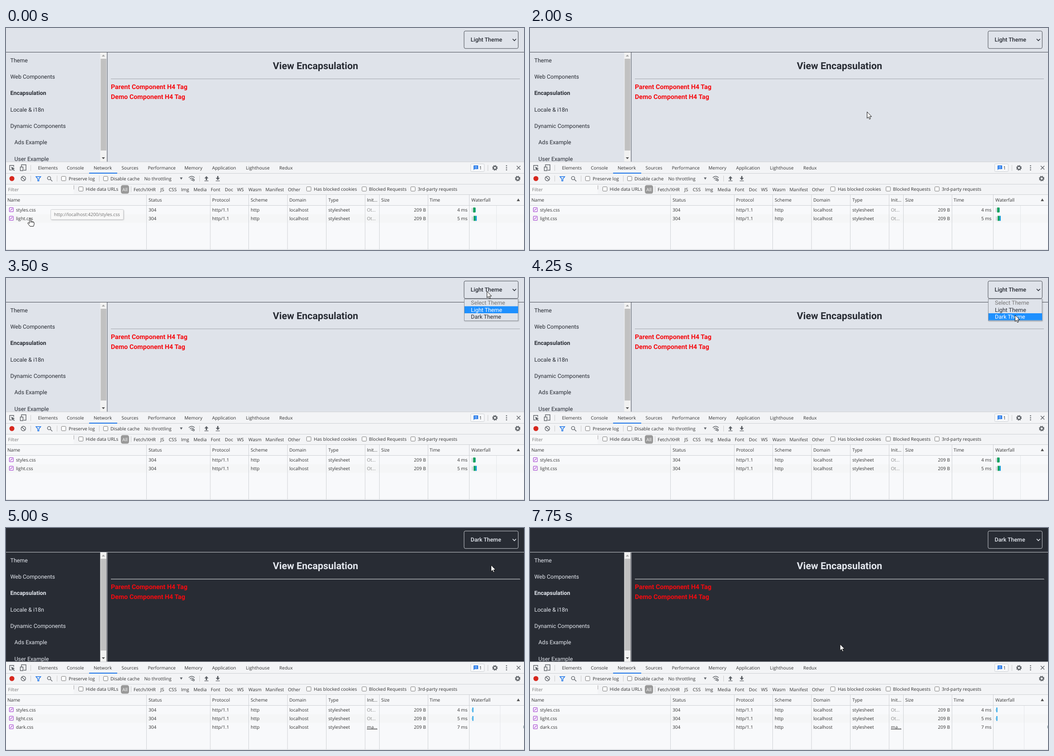
Write an HTML page that moves like this. It is 1141x491 px and loops after 8 s.

```html
<!DOCTYPE html>
<html lang="en">
<head>
<meta charset="utf-8">
<title>Theme switch</title>
<style>
html, body { margin: 0; width: 100%; height: 100%; overflow: hidden; }
svg { display: block; width: 100%; height: 100%; --bg: #dfe3ea; --ink: #282c34; --line: #464a52; --rule: #a3a7ad; }
svg.dark { --bg: #282c34; --ink: #e3e7ee; --line: #c9ccd1; --rule: #8b8e93; }
text { white-space: pre; text-rendering: geometricPrecision; }
.page { font: 12.45px Roboto, sans-serif; fill: var(--ink); }
.tools { font: 10.1px "Open Sans", sans-serif; fill: #333; }
.b { font-weight: 700; }
.m { font-weight: 500; }
.dim { fill: #777; }
.icon { fill: none; stroke: #5f6368; stroke-width: 1.4; }
.shadow { filter: drop-shadow(1px 1px 1px #0003); }
.light .onDark, .dark .onLight { display: none; }
</style>
</head>
<body>
<svg id="stage" class="light" viewBox="0 0 1141 491" preserveAspectRatio="none"></svg>
<script>
const stage = document.getElementById('stage');
const text = (x, y, s, attrs = '') => `<text x="${x}" y="${y}" ${attrs}>${s}</text>`;
const rect = (x, y, w, h, fill, attrs = '') =>
  `<rect x="${x}" y="${y}" width="${w}" height="${h}" fill="${fill}" ${attrs}/>`;
const icon = (d, attrs = '') => `<path class="icon" d="${d}" ${attrs}/>`;
const group = (attrs, ...parts) => `<g ${attrs}>${parts.join('')}</g>`;
const labels = (y, list) => list.map(([x, s]) => text(x, y, s)).join('');
const hLine = (y, color = '#cdd0d4') => rect(0, y, 1141, 1, color);
const divider = (x, y) => rect(x, y, 1, 13, '#ccc');
const checkbox = (x, y) =>
  rect(x - 4.8, y - 4.8, 9.6, 9.6, '#fff', 'rx="1.5" stroke="#767676"');
const gear = (x, y, scale = 1) =>
  group(`class="icon" transform="translate(${x} ${y}) scale(${scale})"`,
    '<circle r="3.6" stroke-width="2.4"/>',
    '<circle r="5.2" stroke-width="1.8" stroke-dasharray="2.1 1.98"/>');

function page() {
  const nav = ['Theme', 'Web Components', 'Encapsulation', 'Locale &amp; i18n',
    'Dynamic Components', 'Ads Example', 'User Example'];
  return group('class="page"',
    rect(0, 0, 1141, 296, 'var(--bg)'),
    rect(0, 53, 1141, 1, 'var(--line)'),
    nav.map((s, i) => text(i > 4 ? 18.5 : 9.5, 75.8 + i * 36.3, s, i == 2 ? 'class="b"' : '')).join(''),
    rect(207.5, 54, 14, 242, '#f1f1f1'),
    rect(208.5, 68, 12.5, 203, '#c1c1c1'),
    '<path d="M211 63l3.5-4 3.5 4z" fill="#a3a3a3"/><path d="M211 286l3.5 4 3.5-4z" fill="#505050"/>',
    rect(222.5, 54, 1, 242, 'var(--line)'),
    text(681.8, 90.5, 'View Encapsulation', 'class="b" text-anchor="middle" font-size="21.4"'),
    rect(231, 112, 901, 1, 'var(--rule)'),
    rect(231, 113, 902, 1, 'var(--rule)', 'class="onDark"'),
    group('class="b" font-size="14.25" fill="#f50a0f"',
      text(231, 135.3, 'Parent Component H4 Tag'),
      text(231, 157.3, 'Demo Component H4 Tag')),
    rect(1009, 6.7, 119.3, 38.6, 'var(--bg)', 'rx="3" stroke="var(--line)"'),
    text(1023.5, 30.3, 'Light Theme', 'class="m onLight"'),
    text(1023.5, 30.3, 'Dark Theme', 'class="m onDark"'),
    '<path d="M1116 24.3l3.8 3.8 3.8-3.8" fill="none" stroke="var(--ink)" stroke-width="1.5"/>');
}

function toolbars() {
  return [
    rect(0, 296, 1141, 195, '#f3f4f6'),
    hLine(295.5), hLine(321), hLine(345), hLine(368),
    // tab strip
    labels(313, [[70.5, 'Elements'], [134, 'Console'], [193, 'Network'], [254.5, 'Sources'],
      [312.5, 'Performance'], [393, 'Memory'], [454, 'Application'], [528.5, 'Lighthouse'], [602, 'Redux']]),
    rect(183, 320, 62, 2, '#1a73e8'),
    icon('M17 307v-3H8v10h4'),
    '<path d="M11.5 307l8 3.4-3.4 1.3 3 3-1.3 1.3-3-3-1.2 3z" fill="#5f6368"/>',
    icon('M34 307v-4.5h10v12h-5M31.5 307.5h6v8h-6z'),
    divider(54, 303),
    rect(1023.5, 300.5, 30, 17, '#f7f8fa', 'rx="2" stroke="#cdd0d4"'),
    '<path d="M1030 304h10v8h-8l-2 2.5z" fill="#1a73e8"/><path d="M1032 306.5h6M1032 309.5h6" stroke="#fff"/>',
    text(1042.5, 313, '1'),
    divider(1061, 303), gear(1077, 309.3),
    [304.8, 309.3, 313.8].map(y => `<circle cx="1102.5" cy="${y}" r="1.3" fill="#5f6368"/>`).join(''),
    icon('M1125 305l8 8m0-8l-8 8'),
    // action row
    '<circle cx="13" cy="333" r="5.5" fill="#d7281e"/>',
    icon('M43.3 333a5 5 0 1 0-10 0a5 5 0 1 0 10 0M35 329.5l7 7'),
    divider(54, 326.5),
    icon('M66 328.7h10.5l-4 5v4.5h-2.5v-4.5z', 'style="stroke:#1a73e8"'),
    icon('M98.5 332a3.6 3.6 0 1 0-7.2 0a3.6 3.6 0 1 0 7.2 0M97.5 334.6l4.5 4.5'),
    divider(112, 326.5), checkbox(127, 333), divider(205, 326.5), checkbox(219.5, 333),
    labels(336.7, [[138, 'Preserve log'], [230, 'Disable cache'], [304.5, 'No throttling']]),
    '<path d="M383 330.5h6l-3 5z" fill="#5f6368"/>',
    icon('M402.5 331q6.500-6 13 0M405 333.8q4-3.5 8 0M407.5 336.5q1.5-1.5 3 0'),
    gear(413, 336.3, .48),
    divider(426, 326.5),
    '<path d="M441.5 327.5l4.5 5h-3v4h-3v-4h-3zM437 337.5h9v1.3h-9z' +
      'M466.5 336.5l4.5-5h-3v-4h-3v4h-3zM462 337.5h9v1.3h-9z" fill="#5f6368"/>',
    gear(1127, 333),
    // filter row
    rect(0, 347, 149, 20, '#f8f9fa'), rect(149, 348, 1, 9, '#aaa'),
    text(4.5, 360.7, 'Filter', 'class="dim"'),
    checkbox(165, 356), checkbox(667, 356), checkbox(789, 356), checkbox(896.5, 356),
    labels(360.2, [[175.5, 'Hide data URLs'], [678, 'Has blocked cookies'],
      [799.5, 'Blocked Requests'], [907, '3rd-party requests']]),
    rect(253, 347.5, 18, 19, '#999', 'rx="4.5"'),
    text(262, 360.7, 'All', 'fill="#fff" text-anchor="middle"'),
    divider(275, 350),
    labels(360.7, [[281, 'Fetch/XHR'], [340, 'JS'], [358.5, 'CSS'], [385.5, 'Img'], [413, 'Media'],
      [451, 'Font'], [482, 'Doc'], [509, 'WS'], [534, 'Wasm'], [571.5, 'Manifest'], [621, 'Other']])
  ].join('');
}

function requestRow(name, y, time, initiator, attrs) {
  return group(attrs,
    rect(7.5, y - 8.3, 8.5, 9, '#fff', 'rx="1" stroke="#a950d2" stroke-width="1.3"'),
    icon(`M9.5 ${y - 1.6}l4.5-4.5`, 'style="stroke:#a950d2"'),
    labels(y, [[22, name], [314, '304'], [454, 'http/1.1'], [539, 'http'], [624, 'localhost'], [710, 'stylesheet']]),
    initiator,
    text(925, y, '209 B', 'text-anchor="end"'),
    text(1016.5, y, time, 'text-anchor="end"'));
}

function table() {
  const other = y => text(795, y, 'Ot...', 'fill="#888"');
  return [
    rect(0, 369, 1141, 23, '#f6f7f9'),
    rect(0, 392, 1141, 99, '#f8f9fb'),
    rect(0, 412, 1141, 18.5, '#f5f6f7'),
    hLine(392), hLine(489.5),
    '<rect id="patch" y="457" width="105" height="32" fill="#fff"/>',
    [309, 449.5, 534, 619.5, 705, 790.5, 822, 929, 1020].map(x => rect(x, 369, 1, 121, '#cfd2d6')).join(''),
    labels(384, [[3, 'Name'], [314, 'Status'], [454, 'Protocol'], [539, 'Scheme'], [624, 'Domain'],
      [710, 'Type'], [795, 'Init...'], [826.5, 'Size'], [933, 'Time'], [1025, 'Waterfall']]),
    '<path d="M1125 383l3.5-6 3.5 6z" fill="#555"/>',
    requestRow('styles.css', 405.7, '4 ms', other(405.7), ''),
    requestRow('light.css', 424.7, '5 ms', other(424.7), ''),
    requestRow('dark.css', 443.5, '7 ms',
      text(795, 443.5, 'ma...', 'text-decoration="underline"'), 'class="onDark"'),
    group('class="onLight"',
      rect(1080, 393, 1, 97, '#e4e7ea'),
      rect(1025.5, 398, 3, 9, '#d3d9dc'), rect(1029, 397, 5, 11, '#14a25d'), rect(1034, 398, 1, 9, '#65c7dc'),
      rect(1026, 417, 3, 9, '#d3d9dc'), rect(1030, 415.5, 4, 11, '#14a25d'), rect(1034, 415.5, 3, 11, '#1b9fd4')),
    group('class="onDark"',
      rect(1088, 393, 1, 97, '#e4e7ea'),
      [397, 416].map(y => rect(1025, y + 3, 2, 5, '#cde3e8') + rect(1027.3, y, 2.2, 10.5, '#1c9fe8')).join(''),
      rect(1139.5, 437, 1.5, 6, '#9aa9b0'))
  ].join('');
}

const tooltip = (id, x, y, width, file) => group(`id="${id}"`,
  rect(x, y, width, 22, '#f8f8f8', 'rx="2" stroke="#cfd1d4" class="shadow"'),
  text(x + 7.3, y + 14.8, `http://localhost:4200/${file}`, 'fill="#707070"'));

const dropdown = group('id="menu" class="page"',
  rect(1009.5, 46.5, 118.5, 48, '#dfe3ea', 'stroke="#8d9299" class="shadow"'),
  '<rect id="choice" x="1010" width="118" height="15.5" fill="#1e90ff"/>',
  text(1024, 59, 'Select Theme', 'class="dim"'),
  text(1024, 74.5, 'Light Theme', 'id="lightItem"'),
  text(1024, 90, 'Dark Theme', 'id="darkItem"'));

const cursors = '<g id="cursor" fill="#fff" stroke="#111" stroke-linejoin="round">' +
  '<path id="arrow" d="M0 0V14.2L3.2 11.2 5.2 16.2 7.6 15.2 5.5 10.5H10Z"/>' +
  '<path id="hand" d="M-1.5 .5q1.5-2 3 0v6l5.5 1.2q2 .6 2 2.5v3l-1.5 4.5h-7.5l-4.7-6q-1-2.2 1-2.2l2.200 1.8z' +
  'M1.5 6.5v3M4.2 7v2.5M6.8 7.6v2"/></g>';

stage.innerHTML = page() + group('class="tools"', toolbars(), table(),
  tooltip('stylesTip', 98.5, 401.5, 160, 'styles.css'),
  tooltip('lightTip', 53.5, 439.5, 154, 'light.css')) + dropdown + cursors;

const part = id => document.getElementById(id);
const show = (id, on) => part(id).style.display = on ? '' : 'none';

// time, x, y of the pointer tip
const path = [[0, 53, 421], [1250, 53, 421], [2000, 742.5, 185.5], [2500, 1061, 32], [3500, 1059.5, 29.5],
  [4000, 1068.5, 82], [5000, 1068.5, 82], [6000, 30, 441], [6250, 11, 449], [7250, 11, 449],
  [7500, 340, 349], [7750, 683, 257], [8000, 683, 257]];

function pointerAt(t) {
  const i = path.findIndex(p => p[0] > t);
  const [t0, x0, y0] = path[i - 1], [t1, x1, y1] = path[i];
  const k = (t - t0) / (t1 - t0);
  return [x0 + (x1 - x0) * k, y0 + (y1 - y0) * k];
}

function draw(t) {
  const [x, y] = pointerAt(t);
  const onLink = x < 70 && y < 445;
  const onDarkItem = y > 78;
  stage.setAttribute('class', t < 5000 ? 'light' : 'dark');
  part('cursor').setAttribute('transform', `translate(${x} ${y})`);
  show('hand', onLink);
  show('arrow', !onLink);
  show('stylesTip', t < 250);
  show('lightTip', t >= 750 && t < 1500);
  show('patch', t >= 6250 && t < 6750);
  show('menu', t >= 3000 && t < 4500);
  part('choice').setAttribute('y', onDarkItem ? 78 : 62.5);
  part('lightItem').style.fill = onDarkItem ? '' : '#fff';
  part('darkItem').style.fill = onDarkItem ? '#fff' : '';
}

const start = performance.now();
function tick() {
  const t = (performance.now() - start) % 8000;
  draw(Math.floor(t / 250) * 250);
  requestAnimationFrame(tick);
}
tick();
</script>
</body>
</html>
```
